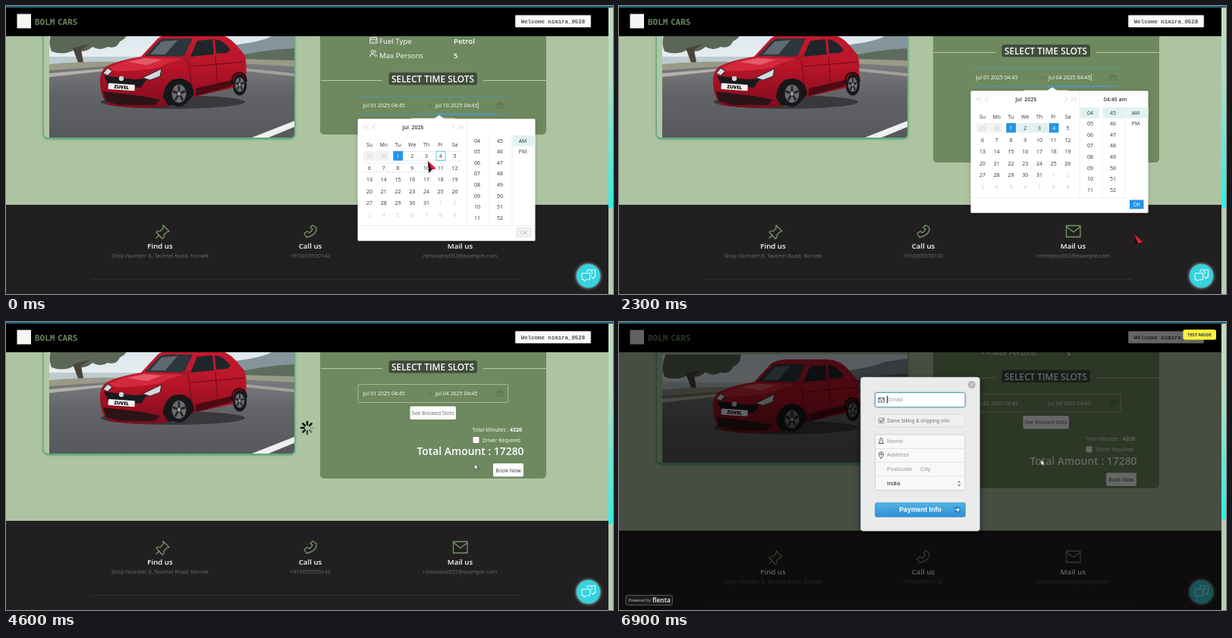
Recreate the animation shown at these times as an HTML page. Size 800x381 px, loop 7 s.

```html
<!DOCTYPE html>
<html lang="en">
<head>
<meta charset="utf-8">
<title>Car booking</title>
<style>
html, body { margin: 0; height: 100%; overflow: hidden; background: #aec4a1; }
svg { display: block; width: 800px; height: 381px; font-family: "Open Sans", "Noto Sans", sans-serif; }
text { font-size: 7px; white-space: pre; }
.mid { text-anchor: middle; }
.end { text-anchor: end; }
.semi { font-weight: 600; }
.white { fill: #fff; }
.dark { fill: #333; }
.dim { fill: #c6c6c6; }
.big { font-size: 9.7px; }
.contact { font-size: 7.2px; fill: #6e6b6e; }
.line { fill: none; stroke-linecap: round; stroke-linejoin: round; }
.form text { font: 8px "Liberation Sans", Arial, sans-serif; fill: #999; }

.before, .after, .jump, .grown, .small, .focus, .plain, .page, .bar, .listbar, .red, .hand, .arrow, .loader {
  animation: 7s step-end infinite;
}
.before { animation-name: before; }
.after { animation-name: after; }
.jump { animation-name: jump; }
.grown { animation-name: grown; }
.small { animation-name: small; }
.focus { animation-name: focus; }
.plain { animation-name: plain; }
.page { animation-name: page; }
.bar { animation-name: bar; }
.listbar { animation-name: listbar; }
.red { animation-name: red; }
.hand { animation-name: hand; }
.arrow { animation-name: arrow; }
.loader { animation-name: loader; }
.cal { animation: cal 7s linear infinite; }
.shade { animation: shade 7s linear infinite; }
.badge { animation: badge 7s linear infinite; }
.modal { animation: modal 7s ease-out infinite; transform-origin: 397px 175px; }
.pointer { animation: move 7s ease-in-out infinite; }
.spin { animation: spin 1s steps(8) infinite; }

@keyframes before { 0% { opacity: 1 } 8.6%, 100% { opacity: 0 } }
@keyframes after { 0% { opacity: 0 } 8.6%, 100% { opacity: 1 } }
@keyframes jump { 0% { transform: translateY(0) } 31.4%, 100% { transform: translateY(-37px) } }
@keyframes grown { 0% { opacity: 0 } 31.4%, 100% { opacity: 1 } }
@keyframes small { 0% { opacity: 1 } 31.4%, 100% { opacity: 0 } }
@keyframes focus { 0% { opacity: 1 } 34.3%, 100% { opacity: 0 } }
@keyframes plain { 0% { opacity: 0 } 34.3%, 100% { opacity: 1 } }
@keyframes page { 0% { transform: translateY(0) } 92.1%, 100% { transform: translateY(12.5px) } }
@keyframes bar { 0% { transform: translateY(0) } 92.1%, 100% { transform: translateY(-6px) } }
@keyframes listbar { 0% { opacity: 0 } 15.7% { opacity: 1 } 21.4%, 100% { opacity: 0 } }
@keyframes red { 0% { opacity: 1 } 41%, 100% { opacity: 0 } }
@keyframes hand { 0% { opacity: 0 } 41% { opacity: 1 } 61.4%, 100% { opacity: 0 } }
@keyframes arrow { 0% { opacity: 0 } 61.4%, 100% { opacity: 1 } }
@keyframes loader { 0% { opacity: 0 } 61.4% { opacity: 1 } 84.2%, 100% { opacity: 0 } }
@keyframes cal { 0%, 33% { opacity: 1 } 35%, 100% { opacity: 0 } }
@keyframes shade { 0%, 82.8% { opacity: 0 } 88.57% { opacity: .4 } 94.3%, 100% { opacity: .6 } }
@keyframes badge { 0%, 84.2% { opacity: 0 } 88.57% { opacity: .75 } 91.4%, 100% { opacity: 1 } }
@keyframes modal {
  0%, 92% { opacity: 0; transform: scale(.92) }
  95%, 100% { opacity: 1; transform: none }
}
@keyframes move {
  0% { transform: translate(556px, 205px) }
  5%, 10% { transform: translate(574px, 199px) }
  18.57% { transform: translate(639px, 275px) }
  29%, 33.2% { transform: translate(679px, 302px) }
  43%, 61% { transform: translate(655px, 191px) }
  72%, 100% { transform: translate(556px, 182px) }
}
@keyframes spin { to { transform: rotate(360deg) } }
</style>
</head>
<body>
<svg viewBox="0 0 800 381">
  <defs>
    <linearGradient id="thumb" x2="0" y2="1">
      <stop offset="0" stop-color="#c3dcc0"/><stop offset=".35" stop-color="#b4dcc2"/><stop offset="1" stop-color="#2bf0e6"/>
    </linearGradient>
    <linearGradient id="listThumb" x2="0" y2="1">
      <stop offset="0" stop-color="#fff"/><stop offset="1" stop-color="#2be4e0"/>
    </linearGradient>
    <linearGradient id="pay" x2="0" y2="1">
      <stop offset="0" stop-color="#52b3e4"/><stop offset="1" stop-color="#2d90d6"/>
    </linearGradient>
    <linearGradient id="sky" x2="0" y2="1">
      <stop offset="0" stop-color="#d9e6ed"/><stop offset="1" stop-color="#edf1f0"/>
    </linearGradient>
    <linearGradient id="road" x2="0" y2="1">
      <stop offset="0" stop-color="#7b7c7f"/><stop offset=".4" stop-color="#636468"/><stop offset="1" stop-color="#57585c"/>
    </linearGradient>
    <linearGradient id="paint" x2="0" y2="1">
      <stop offset="0" stop-color="#c51a2f"/><stop offset=".45" stop-color="#b81529"/><stop offset="1" stop-color="#7c0c1c"/>
    </linearGradient>
    <clipPath id="photo"><path d="M57 30H380V169Q380 174 375 174H57Z"/></clipPath>
    <g id="wheel">
      <circle r="16" fill="#17171a"/><circle r="11" fill="#6a6c71"/>
      <path d="M0 0V-10M0 0L9.5-3M0 0L6 8M0 0L-6 8M0 0L-9.5-3" stroke="#222" stroke-width="3"/>
      <circle r="2.5" fill="#999"/>
    </g>
  </defs>
  <rect width="800" height="381" fill="#aec4a1"/>

  <g class="page">
    <rect x="49.500" y="20" width="331" height="154.500" rx="6" fill="#b1c6a4" stroke="#59a876" stroke-width=".7" style="filter:drop-shadow(0 1px 1.500px #2a9462)"/>
    <g clip-path="url(#photo)">
      <rect x="57" y="30" width="323" height="60" fill="url(#sky)"/>
      <path d="M255 62Q285 54 312 50T350 40L380 36V72H255Z" fill="#84959b"/>
      <path d="M300 68Q335 58 380 56V76H300Z" fill="#5d6c5c"/>
      <path d="M57 67H180V78H57Z" fill="#bccbd0"/>
      <path d="M62 30H160Q162 42 150 47Q146 57 134 54Q124 60 114 54Q102 64 90 58Q76 66 60 60Q54 48 62 30Z" fill="#5b6656"/>
      <path d="M88 56L97 80H103L99 58L110 50Z" fill="#4a453c"/>
      <path d="M57 77Q120 71 180 75L310 70L380 72V88H57Z" fill="#9a9a87"/>
      <path d="M57 85L130 80L310 76L380 80V174H57Z" fill="url(#road)"/>
      <path d="M57 89L130 83V86L57 94Z" fill="#b4b2a8"/>
      <path d="M312 82L380 89V93L314 86Z" fill="#a3a29a"/>
      <path d="M324 174L380 152V160L346 174Z" fill="#efefed"/>
      <ellipse cx="220" cy="127" rx="95" ry="9" fill="#29292c" opacity=".7"/>
      <use href="#wheel" transform="translate(308 104) scale(.58 .9)"/>
      <path d="M124 101Q123 87 132 80Q150 71 178 67L200 43Q206 38 220 37H275Q292 38 303 51L314 64Q318 73 316 95L300 108L248 120L212 133Q170 137 136 131Q125 123 124 101Z" fill="url(#paint)"/>
      <path d="M136 81Q158 71 181 68L234 70Q214 74 203 81Q170 87 142 86Z" fill="#d4283c"/>
      <path d="M160 74L183 69L206 71L186 78Z" fill="#e55a68"/>
      <path d="M183 66L202 46Q205 43 212 43H246Q240 55 235 67Z" fill="#2d363c"/>
      <path d="M190 64L205 47L226 45L210 64Z" fill="#5d6a70"/>
      <path d="M243 67L252 46L272 44L274 64ZM277 63L275 44Q287 45 296 58L291 62Z" fill="#20252a"/>
      <path d="M240 72L246 112M276 66L279 104M243 80L314 74" class="line" stroke="#6b0a17"/>
      <path d="M250 109L297 98V106L250 119Z" fill="#4c0a13"/>
      <path d="M232 65h10q2 5-2 7h-8Z" fill="#a9162a"/>
      <path d="M129 92L168 97L186 96L178 108L135 105Z" fill="#1a1a1e"/>
      <path d="M128 113L178 119L203 124L196 131L150 131L132 126Z" fill="#2c1317"/>
      <path d="M128 89L134 82L140 86L134 92ZM180 95L205 83L203 93L190 98Z" fill="#d2d9dd" stroke="#2a2a2e"/>
      <circle cx="152" cy="96" r="3.200" fill="#cfd1d4"/>
      <g transform="translate(135 102) rotate(4)">
        <rect width="35" height="8" rx="1" fill="#f4f4f4"/>
        <text x="17.500" y="6.300" class="mid" style="font-size:6.200px;font-weight:800">ZUVEL</text>
      </g>
      <path d="M207 121Q209 96 229 96Q246 97 248 117L238 128L214 132Z" fill="#161618"/>
      <use href="#wheel" transform="translate(228 116) scale(.86 1.08)"/>
      <path d="M298 103Q297 89 308 88Q316 89 317 99" class="line" stroke="#22060b" stroke-width="2"/>
      <use href="#wheel" transform="translate(308 104) scale(.56 .87)"/>
    </g>

    <rect y="263" width="794" height="130" fill="#221f21"/>
    <g class="line" stroke="#759966" stroke-width="1.300">
      <path d="M207 290L215 298L212 299L208 303Q209 306 206 308L198 299Q200 297 203 298L207 294ZM202 303L198 307"/>
      <path d="M404 290L409 293Q410 303 396 306L393 301L397 298L400 300Q403 298 404 295L401 293Z"/>
      <path d="M589.500 290.500H608V305.500H589.500ZM590 292L599 299L608 292"/>
    </g>
    <g class="white mid semi">
      <text x="203" y="321" class="big">Find us</text>
      <text x="401" y="321" class="big">Call us</text>
      <text x="598.500" y="321" class="big">Mail us</text>
    </g>
    <g class="mid">
      <text x="203" y="333" class="contact">Shop Number 6, Tavimel Road, Norvek</text>
      <text x="401" y="333" class="contact">+910005550142</text>
      <text x="598.500" y="333" class="contact">nimiradov052@example.com</text>
    </g>
    <path d="M113 361.500H677" stroke="#3b383b" stroke-dasharray="2 1"/>

    <rect class="small" x="414" y="10" width="298" height="160" rx="5" fill="#6e895f"/>
    <rect class="grown" x="414" y="10" width="298" height="197" rx="5" fill="#6e895f"/>
    <g class="jump">
      <g class="line" stroke="#fff" stroke-width=".9">
        <path d="M480.500 44V41.500H488.500V44M480 44H489V49H480ZM482 46.500h.5M486.500 46.500h.5"/>
        <circle cx="483" cy="60.500" r="2"/>
        <path d="M479.500 67Q480 63.500 483 63.500T486.500 67M486 58.500Q489 60 486.500 62.500M487 64Q489 65 489.500 67"/>
      </g>
      <g class="white">
        <text x="492" y="49.500" class="big">Fuel Type</text>
        <text x="590" y="49.800" class="big semi">Petrol</text>
        <text x="492" y="68.500" class="big">Max Persons</text>
        <text x="590" y="69" class="big semi">5</text>
      </g>
      <path d="M415 98.500H496M629 98.500H712" stroke="#b9caae"/>
      <rect x="504.500" y="88" width="116.500" height="16.500" rx="3" fill="#414c3b"/>
      <text x="562.500" y="101" class="white semi mid" style="font-size:11.800px">SELECT TIME SLOTS</text>

      <rect class="plain" x="464" y="119.500" width="197.500" height="24" rx="1" fill="none" stroke="#b3c3a9" stroke-width=".8"/>
      <g class="focus" stroke="#3f9ddd">
        <path d="M464 119.500H661M464 143.500H661" stroke-width=".9" opacity=".75"/>
        <path d="M566 143.300H643" stroke-width="1.400"/>
        <path d="M622.300 127V136" stroke="#fff" stroke-width=".7"/>
      </g>
      <g class="white">
        <text x="470.500" y="134.300">Jul 01 2025 04:45</text>
        <text x="566" y="134.300" class="before">Jul 10 2025 04:45</text>
        <text x="566" y="134.300" class="after">Jul 04 2025 04:45</text>
      </g>
      <path d="M556 132H562L560 130M648 129H655V135H648ZM648 131H655M650 128V129M653 128V129" class="line" stroke="#556a4b" stroke-width=".7"/>
      <rect x="532.500" y="148.500" width="60.500" height="17.500" rx="2" fill="#fff"/>
      <text x="562.700" y="159.800" class="mid" fill="#62665f">See Booked Slots</text>

      <g class="grown">
        <g class="white">
          <text x="680" y="181.700" class="end">Total Minutes : <tspan font-weight="700">4320</tspan></text>
          <rect x="615.500" y="189" width="8" height="8" rx="1.300"/>
          <text x="628" y="195.800" style="font-size:6.800px">Driver Required</text>
          <text x="682.500" y="213" class="end semi" style="font-size:13.900px">Total Amount : 17280</text>
          <rect x="642" y="224" width="40" height="17.500" rx="2"/>
        </g>
        <text x="662" y="235.800" class="mid dark">Book Now</text>
      </g>

      <g class="cal">
        <path d="M562.500 150L571 144.500L579.500 150Z" fill="#fff"/>
        <rect x="463.500" y="149.300" width="234" height="161.500" rx="1.500" fill="#fff" style="filter:drop-shadow(0 2px 3px #0003)"/>
        <path d="M607 150V290M637 170V290M667 170V290M464 290.500H697" stroke="#f0f0f0"/>
        <path d="M474 157.500L471 160L474 162.500M478 157.500L475 160L478 162.500M486 157.500L483 160L486 162.500M588 157.500L591 160L588 162.500M596 157.500L599 160L596 162.500M600 157.500L603 160L600 162.500" class="line" stroke="#ccc" stroke-width=".8"/>
        <text x="536.500" y="162.500" class="mid semi dark">Jul  2025</text>
        <rect x="471" y="192" width="34" height="12.500" fill="#f3f2f2"/>
        <rect x="668" y="171" width="29.500" height="14.500" fill="#e2f2f3"/>
        <g class="before">
          <path d="M523 192.500H600M523 204H600M470 208H561M470 219.500H561" stroke="#b3cfd8" stroke-width=".7" stroke-dasharray="1.500 1.500"/>
          <rect x="567" y="192.300" width="12" height="12" fill="none" stroke="#5cc0cb" stroke-width=".9"/>
          <rect x="673" y="293.500" width="18.500" height="12" fill="#f2f2f2" stroke="#d6d6d6" stroke-width=".7"/>
          <text x="682.300" y="302" class="mid" fill="#b5b5b5">OK</text>
        </g>
        <g class="after">
          <path d="M523 192H567V204.500H523ZM607.500 171H633V185.500H607.500ZM638 171H667V185.500H638Z" fill="#e0f1f2"/>
          <path d="M567 192H579.500V204.500H567ZM673 293.500H691.500V305.500H673Z" fill="#2694e8"/>
          <text x="654" y="162.500" class="mid semi dark">04:45 am</text>
          <text x="682.300" y="302" class="mid white">OK</text>
        </g>
        <rect x="510.300" y="192" width="12.700" height="12.500" fill="#2694e8"/>
        <g id="days" class="mid dark"></g>
        <text x="573.200" y="201" class="mid white after">4</text>
        <rect class="listbar" x="633" y="197" width="6.500" height="48" rx="3" fill="url(#listThumb)"/>
      </g>
    </g>
  </g>

  <rect y="2" width="794" height="38" fill="#000"/>
  <rect x="14.500" y="10.500" width="18.500" height="19" fill="#f4f6f2"/>
  <g fill="#66865a" style="font-family:'DejaVu Sans Mono',monospace;font-weight:700">
    <text x="38" y="24.600" style="font-size:11px">BOLM</text>
    <text x="68" y="24.600" style="font-size:11px">CARS</text>
  </g>
  <rect x="671.300" y="12.300" width="99.400" height="15.700" rx="1" fill="#fafbf8" stroke="#ccc" stroke-width=".6"/>
  <text x="721" y="22.800" class="mid" fill="#505050" style="font:700 7.400px 'Liberation Mono','Courier New',monospace">Welcome nimira_0528</text>

  <circle cx="767.500" cy="357" r="15.500" fill="#35d3de" style="filter:drop-shadow(0 0 2px #c6f6f8)"/>
  <g class="line" stroke="#fff" stroke-width=".95">
    <path d="M766 352V349H776.500V358.500H774V361L771.500 358.500"/>
    <path d="M759.500 353.500H769.500V362H764.500L762 364.500V362H759.500Z"/>
    <path d="M770 351.500Q771.500 350 772.500 351.500T771.500 354.500M771.500 356.500v.1"/>
  </g>

  <g transform="translate(397 140)"><g class="loader"><g class="spin" id="spokes"></g></g></g>

  <rect x="794" width="6" height="381" fill="#b9ccb1"/>
  <rect class="bar" x="794" y="2" width="6" height="265" fill="url(#thumb)"/>

  <rect class="shade" y="2" width="794" height="379"/>
  <g class="badge">
    <rect x="9" y="361.500" width="61.500" height="13" rx="2.500" fill="#1c1c1c" stroke="#777" stroke-width=".7"/>
    <text x="12.500" y="369.800" fill="#c4c4c4" style="font-size:5.400px">Powered by</text>
    <text x="44" y="370.800" fill="#d2d2d2" style="font-size:8px;font-weight:700">flenta</text>
  </g>

  <g class="modal form">
    <rect x="318.500" y="73" width="157" height="203.500" rx="3.500" fill="#ebebeb" stroke="#bbb" stroke-width=".6" style="filter:drop-shadow(0 2px 4px #0008)"/>
    <circle cx="465" cy="83" r="4.800" fill="#a9a9a9"/>
    <path d="M463 81L467 85M467 81L463 85" class="line" stroke="#eee" stroke-width="1.100"/>
    <rect x="337.500" y="93.500" width="118.500" height="19" rx="2.500" fill="#fff" stroke="#5f9fae" style="filter:drop-shadow(0 0 1.500px #6fc3d6)"/>
    <path d="M353.500 97.500V107.500" stroke="#222"/>
    <text x="354" y="105.300">Email</text>
    <rect x="337.500" y="122.500" width="118.500" height="16" rx="2" fill="#f0f0f0" stroke="#d6d6d6" stroke-width=".8"/>
    <rect x="342" y="127" width="7.500" height="7" rx="1" fill="#ddd" stroke="#999" stroke-width=".7"/>
    <path d="M343.500 130.500L345.300 132.500L349 127.500" class="line" stroke="#777" stroke-width="1.200"/>
    <text x="353" y="133.300" style="font-size:6.700px;fill:#777">Same billing &amp; shipping info</text>
    <rect x="337.500" y="149" width="118.500" height="73.500" rx="2.500" fill="#f8f8f8" stroke="#cbcbcb" stroke-width=".8"/>
    <path d="M338 167.500H456M338 185.500H456M338 204H456" stroke="#dedede" stroke-width=".8"/>
    <g class="line" stroke="#444" stroke-width=".9">
      <path d="M342.500 100.500H349.500V106H342.500ZM342.500 101L346 104L349.500 101"/>
      <path d="M345.500 153.500Q348 154 347 157Q346.500 158 349 160.500H342Q344.500 158 344 157Q343 154 345.500 153.500Z"/>
      <path d="M345.500 180.500Q342.500 177 342.500 175A3 3 0 0 1 348.500 175Q348.500 177 345.500 180.500Z"/>
      <circle cx="345.500" cy="175" r=".8"/>
    </g>
    <text x="353" y="159.500">Name</text>
    <text x="353" y="178.300">Address</text>
    <text x="353" y="196.800">Postcode</text>
    <text x="397" y="196.800">City</text>
    <text x="353" y="216" style="fill:#222">India</text>
    <path d="M446 212.500L448.300 210L450.600 212.500ZM446 215L448.300 217.500L450.600 215Z" fill="#888"/>
    <rect x="337.500" y="239" width="119" height="19" rx="2.500" fill="url(#pay)" stroke="#3b8fc4" stroke-width=".6"/>
    <text x="397" y="250.600" class="mid" style="font-weight:700;font-size:8.900px;fill:#fff">Payment Info</text>
    <circle cx="446" cy="248.300" r="4" fill="#2478b8"/>
    <path d="M443.500 248.300H448M446.300 246.300L448.300 248.300L446.300 250.300" class="line" stroke="#fff" stroke-width="1.200"/>
  </g>
  <g class="badge">
    <rect x="743.500" y="10" width="43.500" height="13.500" rx="2.500" fill="#fdf13b"/>
    <text x="765.200" y="18.700" class="mid" fill="#28356b" style="font-size:5.700px;font-weight:700">TEST MODE</text>
  </g>
  <rect width="800" height="2.300" fill="#1d6079"/>

  <g class="pointer">
    <g class="red">
      <path d="M0 0L1.500 16L5 12L11 10Z" fill="#e0203f"/>
      <path d="M0 0L1.500 16L5 11.500Z" fill="#1a0a0e"/>
    </g>
    <path class="hand" d="M-1 0Q.8-1 1 1V4.500L5 5.500Q6 6 5.500 8L4.500 11H-1L-4 6.500Q-3.500 5-1.500 7Z" fill="#fff" stroke="#222" stroke-width=".8"/>
    <path class="arrow" d="M0 0V7.500L1.800 6L3 8.500L4.300 8L3.200 5.500H5.500Z" fill="#fff" stroke="#222" stroke-width=".6"/>
  </g>
</svg>
<script>
const $ = id => document.getElementById(id);
function add(parent, tag, attrs, text = '') {
  const node = document.createElementNS(parent.namespaceURI, tag);
  for (const key in attrs) node.setAttribute(key, attrs[key]);
  node.textContent = text;
  parent.append(node);
}
const label = (x, y, text, cls = '') => add($('days'), 'text', { x, y: y + 2.5, class: cls }, text);
const pad = n => String(n).padStart(2, '0');
const colX = i => 479 + 18.75 * i;

['Su', 'Mo', 'Tu', 'We', 'Th', 'Fr', 'Sa'].forEach((name, i) => label(colX(i), 183, name));
for (let i = 0; i < 42; i++) {
  const day = i < 2 ? 29 + i : i < 33 ? i - 1 : i - 32;
  const cls = i < 2 || i > 32 ? 'dim' : i === 2 ? 'white' : i === 5 ? 'before' : '';
  label(colX(i % 7), 198.5 + 15.6 * Math.floor(i / 7), day, cls);
}
for (let i = 0; i < 8; i++) {
  const y = 178 + 14.63 * i;
  label(621, y, pad(4 + i));
  label(651, y, 45 + i);
  if (i < 2) label(681, y, i ? 'PM' : 'AM');
  add($('spokes'), 'path', {
    d: 'M0-4.200V-8', class: 'line', stroke: '#000', 'stroke-width': 2.4,
    transform: `rotate(${45 * i - 90})`, opacity: Math.min(1, 0.15 + 0.25 * i)
  });
}
</script>
</body>
</html>
```
